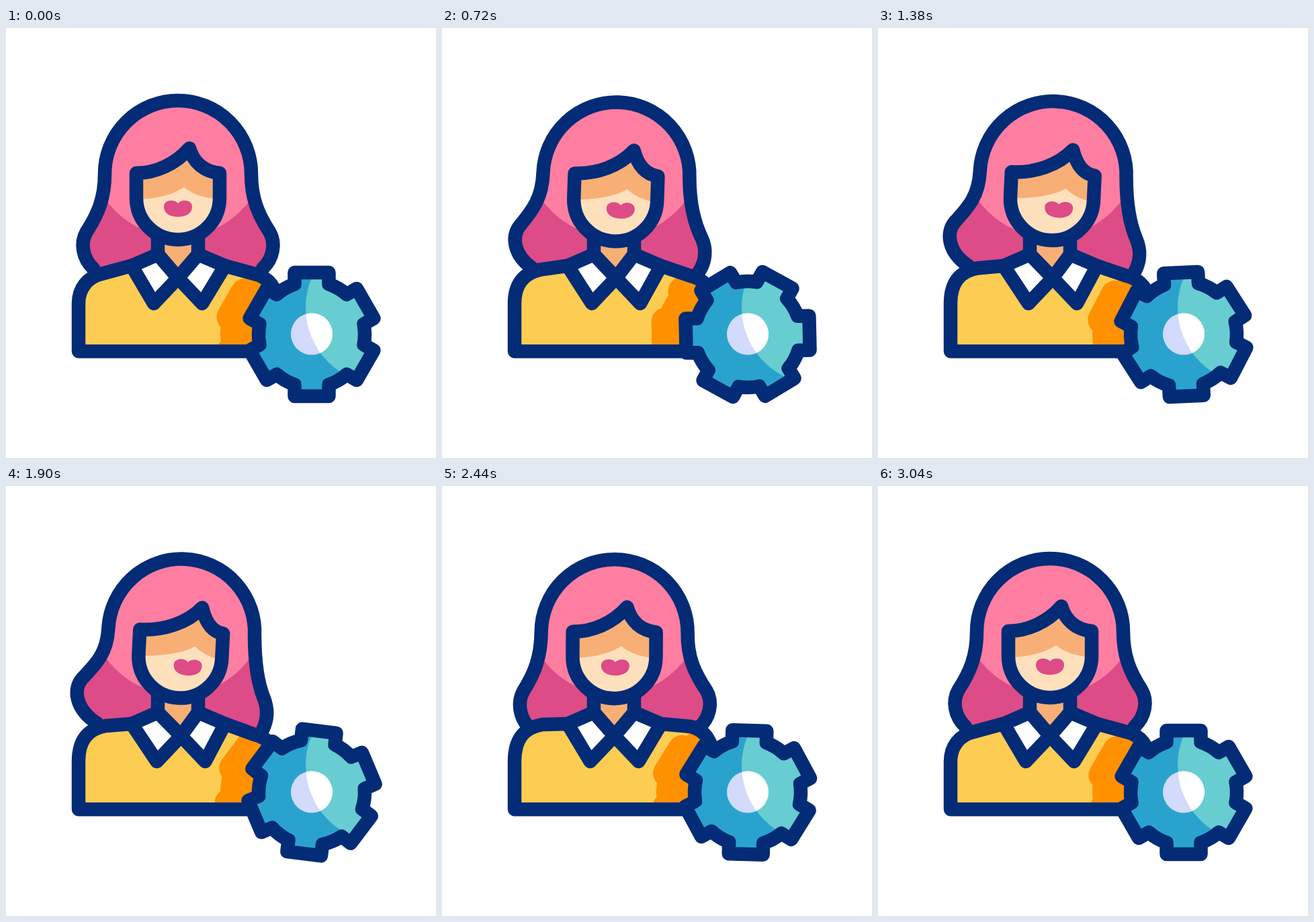
Animation of 640x640 px, one loop 3.12 s. Source, as an HTML page with a canvas:

```html
<!DOCTYPE html>
<html lang="en">
<head>
<meta charset="utf-8">
<title>User settings</title>
<style>
  html, body { margin: 0; width: 100%; height: 100%; overflow: hidden; background: #fff; }
  canvas { display: block; }
</style>
</head>
<body>
<canvas id="stage" width="640" height="640"></canvas>
<script>
const ctx = document.getElementById('stage').getContext('2d');
const LOOP = 3120;
const NAVY = '#042b76', PINK = '#fe7ea1', ROSE = '#dd4c87', SKIN = '#fee0bd', SHADE = '#f8af75';
const ORANGE = '#ff9100';

const TIMES = [0, 440, 1020, 1380, 1900, 2060, 2180, 2440, 2720, 3040];
const TRACKS = {
  turn:  [0, .43, .84, .9, 1, 1.04, .9, .13, .01, 0],
  lobe:  [0, .43, .8, .88, 1, 1.05, .85, -.15, 0, 0],
  dip:   [0, 3, 1.5, 1, .5, .3, .5, 1.2, .3, 0],
  left:  [0, 4, 8, 8.5, 9, 9, 10, 11, 3, 0],
  right: [0, -3, -3, -3, -4, -4, -1, 8, 2, 0]
};

// Monotone cubic interpolation between the poses
function sample(v, t) {
  const last = TIMES.length - 1;
  if (t >= TIMES[last]) return v[last];
  const rate = i => (v[i + 1] - v[i]) / (TIMES[i + 1] - TIMES[i]);
  const slope = i => {
    if (i === 0 || i === last) return 0;
    const a = rate(i - 1), b = rate(i);
    return a * b > 0 ? 2 * a * b / (a + b) : 0;
  };
  const i = TIMES.findIndex(x => x > t) - 1;
  const h = TIMES[i + 1] - TIMES[i], u = (t - TIMES[i]) / h, w = 1 - u;
  return w * w * ((1 + 2 * u) * v[i] + u * h * slope(i))
       + u * u * ((3 - 2 * u) * v[i + 1] - w * h * slope(i + 1));
}

function gearAngle(t) {
  const deg = t < 60 ? 0
    : t < 1960 ? (t - 60) * 255 / 1900
    : Math.min(360, 255 + (t - 1960) * 105 / 1080);
  return deg * Math.PI / 180;
}

function fill(path, color) {
  ctx.fillStyle = color;
  ctx.fill(path);
}

function line(path, color = NAVY, width = 20.5) {
  ctx.strokeStyle = color;
  ctx.lineWidth = width;
  ctx.stroke(path);
}

function disc(x, y, r, color) {
  ctx.fillStyle = color;
  ctx.beginPath();
  ctx.arc(x, y, r, 0, 7);
  ctx.fill();
}

function clipped(path, draw) {
  ctx.save();
  ctx.clip(path);
  draw();
  ctx.restore();
}

function gearPath(cx, cy, half, tip, valley, angle) {
  const p = new Path2D(), base = Math.asin(half / valley);
  for (let i = 0; i < 6; i++) {
    const a = angle + i * Math.PI / 3 - Math.PI / 2, c = Math.cos(a), s = Math.sin(a);
    p.arc(cx, cy, valley, a - Math.PI / 3 + base, a - base);
    for (const side of [-half, half]) p.lineTo(cx + c * tip - s * side, cy + s * tip + c * side);
  }
  p.closePath();
  return p;
}

function drawHair(k) {
  // Each point carries the extra offset it gains when the head is fully turned
  const at = (x, y, dx, dy) => [x + dx * k.lobe, y + dy * k.lobe];
  const hair = new Path2D();
  hair.moveTo(...at(130, 358, 8, 1));
  hair.bezierCurveTo(...at(114, 343, -11, -4), ...at(110, 320, -11, -11), ...at(120, 303, -8, -10));
  hair.bezierCurveTo(...at(137, 277, -5, -7), 147, 253, 147, 217);
  hair.arc(256, 217, 109, Math.PI, 0);
  hair.bezierCurveTo(...at(365, 253, 2, 0), ...at(375, 277, -3, 7), ...at(392, 303, -9, 5));
  hair.bezierCurveTo(...at(402, 320, -12, 3), ...at(398, 343, -7, -3), ...at(382, 358, 2, -2));
  fill(hair, ROSE);
  clipped(hair, () => {
    ctx.resetTransform();
    disc(256, 179, 132, PINK);
  });
  line(hair);
}

function drawFace(k) {
  const d = 12 * k.turn;
  const face = new Path2D(`M194 216C${222 + d * .6} 216 ${252 + d} 203 ${273 + d} 179
    C${279 + d} 200 ${295 + d / 2} 214 318 216V253A62 62 0 0 1 194 253Z`);
  const shade = new Path2D(`M190 255C225 255 ${248 + d} 248 ${265 + d} 237
    C${277 + d} 247 ${295 + d / 2} 254 322 255V150H190Z`);
  const lips = new Path2D(`M${256 + d} 261c-6 -7 -21 -5 -21 5c0 11 11 15 21 15
    s21 -4 21 -15c0 -10 -15 -12 -21 -5Z`);
  fill(face, SKIN);
  clipped(face, () => fill(shade, SHADE));
  fill(lips, ROSE);
  line(face);
}

function drawBody(k, angle) {
  const l = 366 - k.left, r = 366 - k.right, d = 4.5 * k.turn;
  const body = new Path2D(`M108 481.2V410C108 ${l + 22} 121 ${l + 5} ${142 + k.left * .7} ${l}
    L186 354L256 372L326 354L370 ${r}C391 ${r + 5} 404 ${r + 22} 404 410V481.2Z`);
  fill(body, '#fdcc52');
  clipped(body, () => {
    // A wide round stroke softens the teeth of the gear's shadow
    const shadow = gearPath(421, 456, 21, 88, 81, angle);
    fill(shadow, ORANGE);
    line(shadow, ORANGE, 42);
  });
  line(body);
  const neck = new Path2D(`M226 300V337L${256 + d} 372L286 337V300`);
  fill(neck, SHADE);
  line(neck);
  const collar = new Path2D(`M226 337L187 354L${220 + d} 410L${256 + d} 372Z
    M286 337L326 354L${292 + d} 410L${256 + d} 372Z`);
  fill(collar, '#fff');
  line(collar);
}

function drawGear(angle) {
  const gear = gearPath(455, 456, 25.5, 92, 79, angle);
  const hole = new Path2D();
  hole.arc(455, 455.5, 31, 0, 7);
  const twoTone = (path, dark, light) => {
    fill(path, dark);
    clipped(path, () => disc(561, 416, 115, light));
  };
  twoTone(gear, '#29a3ce', '#67cdd1');
  twoTone(hole, '#d2dbfc', '#fff');
  line(gear);
}

function draw(t) {
  const k = {};
  for (const name in TRACKS) k[name] = sample(TRACKS[name], t);
  const angle = gearAngle(t);
  const inHead = part => {
    ctx.save();
    ctx.translate(256, 320 + k.dip);
    ctx.rotate(.05 * k.turn);
    ctx.translate(-256, -320);
    part(k);
    ctx.restore();
  };

  ctx.fillStyle = '#fff';
  ctx.fillRect(0, 0, 640, 640);
  ctx.lineJoin = ctx.lineCap = 'round';
  inHead(drawHair);
  drawBody(k, angle);
  inHead(drawFace);
  drawGear(angle);
}

const start = performance.now();
function tick() {
  draw((performance.now() - start) % LOOP);
  requestAnimationFrame(tick);
}
tick();
</script>
</body>
</html>
```
